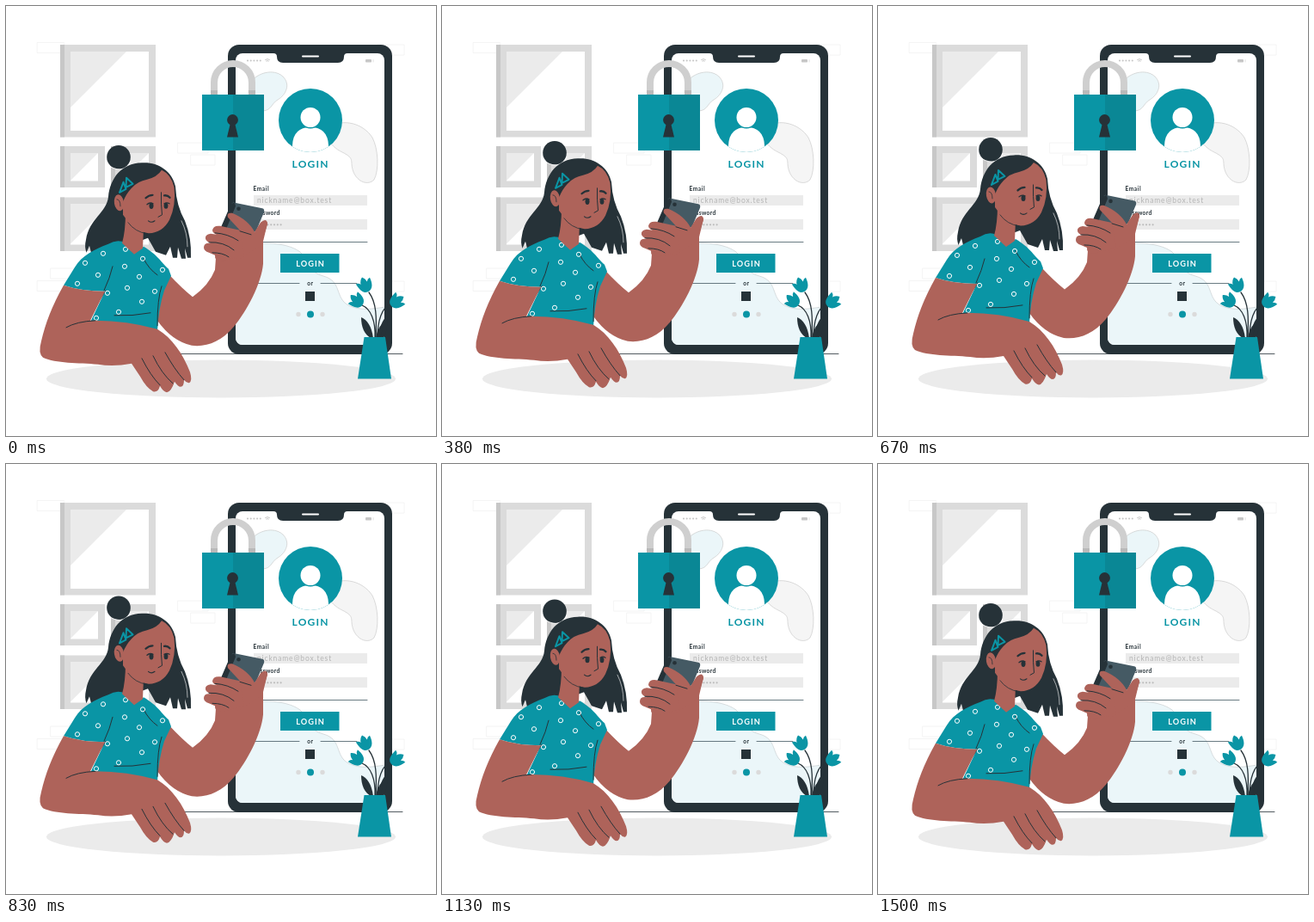
These frames come from a looping animation (500x500 px, 1540 ms). An HTML page with a canvas:

```html
<!DOCTYPE html>
<html lang="en">
<head>
<meta charset="utf-8">
<title>Login illustration</title>
<style>
  html, body { margin: 0; width: 100%; height: 100%; overflow: hidden; background: #fff; }
  canvas { display: block; width: 500px; height: 500px; }
</style>
</head>
<body>
<canvas id="stage"></canvas>
<script>
const LOOP = 1540, STEPS = 37, RISE = 10;
const TEAL = '#0a95a5', INK = '#263238', SKIN = '#ae635a', SLATE = '#455a64';
const PALE = '#ebebeb', GREY = '#dbdbdb', MID = '#c7c7c7', MIST = '#ebf6f9';

const canvas = document.getElementById('stage');
const ratio = window.devicePixelRatio || 1;
canvas.width = canvas.height = 500 * ratio;
const ctx = canvas.getContext('2d');
ctx.lineCap = ctx.lineJoin = 'round';

function fill(d, color) {
  ctx.fillStyle = color;
  ctx.fill(new Path2D(d));
}
function line(d, color = INK, width = 1) {
  ctx.strokeStyle = color;
  ctx.lineWidth = width;
  ctx.stroke(new Path2D(d));
}
function box(x, y, w, h, color, radius = 0) {
  ctx.fillStyle = color;
  ctx.beginPath();
  ctx.roundRect(x, y, w, h, radius);
  ctx.fill();
}
function oval(x, y, rx, ry, color, turn = 0) {
  ctx.fillStyle = color;
  ctx.beginPath();
  ctx.ellipse(x, y, rx, ry, turn, 0, 7);
  ctx.fill();
}
const dot = (x, y, r, color) => oval(x, y, r, r, color);

function label(text, x, y, size, color, { weight = 700, space = 0, align = 'left' } = {}) {
  ctx.font = `${weight} ${size}px Lato, sans-serif`;
  ctx.letterSpacing = space + 'px';
  ctx.textAlign = align;
  ctx.fillStyle = color;
  ctx.fillText(text, x + (align === 'center' ? space / 2 : 0), y);
}

function brick(x, y, w) {
  line(`M${x} ${y}h${w}v12h${-w}z`, '#f1f1f1', 0.8);
}

function picture(x, y, w, h, shade) {
  box(x, y, w, h, GREY);
  box(x, y, 5, h, MID);
  box(x + 12, y + 8, w - 20, h - 15.5, '#fff');
  fill(`M${x + 12} ${y + 8}h${shade}l${-shade} ${Math.min(shade, h - 15.5)}z`, PALE);
}

function drawWall() {
  [[36.5, 42.5, 31], [200, 159, 35], [215, 173, 28], [36.5, 319.5, 34],
   [52, 305, 30], [432, 45, 31], [440, 320, 23]].forEach(b => brick(...b));
  picture(63, 45, 111, 107.5, 65);
  picture(63, 163, 52, 48, 32);
  picture(122, 163, 52, 48, 32);
  picture(63, 222.5, 111, 62.5, 46);
  oval(250, 433.5, 203, 22, PALE);
  line('M100 404.5H461', INK, 0.8);
}

function drawAvatar() {
  dot(354, 133, 37, TEAL);
  ctx.save();
  ctx.beginPath();
  ctx.arc(354, 133, 37, 0, 7);
  ctx.clip();
  dot(354, 130, 13.5, TEAL);
  fill('M333 171V162Q334 141 354 141Q374 141 375 162V171Z', '#fff');
  dot(354, 129.5, 13, TEAL);
  dot(354, 129.5, 11.5, '#fff');
  ctx.restore();
}

function drawScreen() {
  box(258, 45, 191, 360, INK, 13);
  box(267, 55, 173, 339, '#fff', 8);

  ctx.save();
  ctx.beginPath();
  ctx.roundRect(267, 55, 173, 339, 8);
  ctx.clip();
  const drop = 'M285 88C292 78 311 72 322 82C331 91 326 103 316 109C308 114 309 121 299 122C285 122 278 101 285 88Z';
  fill(drop, MIST);
  line(drop, '#ccc', 0.7);
  const pebble = 'M378 140C392 131 415 136 426 153C433 166 434 191 428 202C421 209 409 205 404 193C399 180 407 178 391 170C376 163 368 148 378 140Z';
  fill(pebble, '#f5f5f5');
  line(pebble, '#ccc', 0.7);
  const wave = 'M266 281C287 274 325 273 342 286C356 300 351 309 369 314C391 320 382 339 398 348C412 355 427 352 441 350';
  fill(wave + 'V395H266Z', MIST);
  line(wave, '#c9cfd1', 0.7);
  ctx.restore();

  fill('M311 55Q315 55 315 59Q315 66 322 66H386Q393 66 393 59Q393 55 397 55Z', INK);
  line('M345 58.5H363', '#fff', 2);
  for (let i = 0; i < 5; i++) dot(281 + i * 3.7, 63.5, 1.1, MID);
  line('M301.5 62.5Q304 60.5 306.500 62.5M302.700 64Q304 63 305.300 64', MID, 1);
  box(418, 62, 7, 3.5, MID, 0.8);
  line('M427 62.500V65', GREY, 0.8);

  drawAvatar();
  label('LOGIN', 353.5, 188, 12, TEAL, { space: 1.2, align: 'center' });

  label('Email', 287.5, 215, 6.7, INK, { space: 0.5 });
  box(288, 220, 132, 12, PALE);
  label('nickname@box.test', 292, 229, 8.5, '#b5b5b5', { weight: 400, space: 0.85 });
  label('Password', 287.5, 243, 6.7, INK, { space: 0.3 });
  box(288, 248, 132, 12, PALE);
  for (let i = 0; i < 8; i++) dot(293 + i * 3.8, 254.3, 1.1, '#bdbdbd');

  line('M288 274.500H420', SLATE, 0.8);
  box(319, 288, 68.5, 22, TEAL);
  label('LOGIN', 353.5, 302.5, 9.2, '#fff', { space: 1, align: 'center' });
  line('M288 322.500H341M366 322.500H408', SLATE, 0.8);
  label('or', 353.5, 324.5, 6.5, INK, { space: 0.5, align: 'center' });
  box(348, 332, 11, 11, INK);
  dot(340, 358.5, 2.7, GREY);
  dot(354, 358.5, 4, TEAL);
  dot(368, 358.5, 2.7, GREY);
}

function drawLock() {
  ctx.lineCap = 'butt';
  line('M242 103V89A22 22 0 0 1 286 89V103', '#cfcfcf', 8);
  line('M242 98V103M286 98V103', '#b9b9b9', 8);
  ctx.lineCap = 'round';
  box(228, 103, 72, 65, TEAL);
  box(264, 103, 36, 65, '#0a8795');
  dot(263.5, 132.5, 6.4, INK);
  fill('M261 136H266L270 152.500H257Z', INK);
}

function flower(x, y, turn) {
  ctx.save();
  ctx.translate(x, y);
  ctx.rotate(turn);
  fill('M0 8C-7 8 -8 0 -9 -6Q-5 -6 -4 -3Q-3 -8 1 -10Q4 -7 4 -3Q6 -6 9 -6C9 1 7 8 0 8Z', TEAL);
  ctx.restore();
}

function drawPlant() {
  line('M430 386C431 362 431 345 422 333M429 386C430 366 424 352 414 348M432 386C432 366 437 350 448 346', INK, 1.3);
  fill('M427 386C425 372 420 365 413 362C413 374 417 382 424 386Z', INK);
  fill('M434 386C434 374 437 366 443 360C444 372 442 381 439 386Z', INK);
  fill('M430 386Q432 375 437 370Q438 380 435 386Z', INK);
  flower(417.5, 325, -0.45);
  flower(408, 343, -0.9);
  flower(454, 343.5, 0.9);
  fill('M416.500 385H441L448 433.500H409Z', TEAL);
}

function drawHair() {
  dot(131, 176, 13.8, INK);
  line('M121 187Q139 196 145 181', '#fff', 0.8);
  fill(`M158 182.500C134 183 121 201 119 222C117 241 97 247 93 272Q91 280 93.500 287L97 279L99 287
    L125 285L165 270L174 286L186 290L191 280L194 293H199L200 281L204 294H209L208 282L211 293H215
    Q216 270 208 250Q198 232 197 210C193 191 175 181 158 182.500Z`, INK);
  line('M204 250Q211 264 211 280', '#fff', 0.6);
}

function drawHead() {
  fill('M139 240Q139 262 135 276L149 289L159 282L160 258Z', SKIN);
  oval(131.5, 229, 5.6, 9.6, SKIN, -0.15);
  fill(`M136 228Q140 218 146 212Q153 204 164 202Q176 199 181 191Q192 196 195.500 211
    Q198 232 190 249Q182 264 166 264.500Q150 263 136 243Z`, SKIN);
  line('M129 225Q133 225 133 233', INK, 0.8);
  line('M142 252Q150 263 164 265', INK, 0.8);
  line('M180.500 217Q180 231 181.500 243L177 245.500', INK, 1);
  oval(169, 232.5, 2.5, 3.6, INK);
  oval(186, 232.5, 2.4, 3.5, INK);
  line('M164 231Q167 228 171 230M184 230Q187 228 190 230', INK, 1.3);
  line('M162.500 223.500Q166 220 170.500 220M184 220.500Q188 220 190.500 223', INK, 2.3);
  line('M165.500 250Q169 253 173 250', INK, 1.1);
  line('M132 217L136.500 205L139.500 213ZM139.500 211L140 200L147.500 207Z', TEAL, 2);
}

function drawShirt() {
  fill(`M135 274Q127 272 119 277C101 284 89 290 80 304L67 325Q88 332 115 332L98 368L176 378
    Q177 353 184 331L192 314L189 306C180 298 177 290 160 280Q156 284 149 287Z`, TEAL);
  line('M124 303Q121 316 114 331M160 294Q166 306 176 313M181 326Q176 340 176 372M126 360Q147 361 168 357M116 331L107 345');
  const rings = [[113, 288], [139, 283], [159, 294], [92, 299], [138, 303], [182, 307], [107, 313],
    [83, 323], [155, 315], [118, 334], [141, 328], [173, 332], [158, 344], [131, 356], [105, 363]];
  ctx.strokeStyle = '#fff';
  ctx.lineWidth = 1;
  for (const [x, y] of rings) {
    ctx.beginPath();
    ctx.arc(x, y, 2.6, 0, 7);
    ctx.stroke();
  }
}

function drawRaisedArm() {
  fill(`M183 328L190 313Q205 329 217 338.500Q236 325 243 307L244 293L262 275L290 264L299 254
    Q304 248 304 254L299 270V300C297 323 280 355 265 373C250 391 233 397 216 395
    Q193 390 176 366Q176 344 183 328Z`, SKIN);
}

function drawHandWithPhone() {
  fill('M266 229L298 235.500Q301 236 300 240L292 259Q290 264 286 263L253 268L249 264L262 231Q263 228 266 229Z', SLATE);
  fill('M266 229Q262 229 261 232L248 262L253 267L267 233Z', INK);
  dot(270.5, 236, 2.3, INK);
  fill('M258 246Q256 240 263 241C275 246 285 254 289 263L296 252Q303 246 304 253L298 278L270 296L252 267L272 261Z', SKIN);
  fill(`M272 261L249 256Q241 255 240 261Q240 264 245 266L238 265Q231 266 232 271Q233 274 238 276
    Q230 275 230 281Q230 285 236 287L243 290Q242 297 252 297L277 290Z`, SKIN);
  line('M243 264Q258 265 270 273M236 275Q253 274 265 284M240 287Q252 287 259 292M272 262L285 266', INK, 1);
}

function drawRestingArm() {
  fill(`M67 325Q88 332 115 332L98 366Q137 365 176 376C193 386 206 405 214 426Q217 436 213 438.500
    Q210 439 207 435Q207 443 203 443Q200 443 196 437Q192 449 187 449.500Q183 449 179 442
    Q177 450 171 448.500Q163 444 156 431L146 416Q125 420 107 417C84 415 58 416 43 409
    Q37 404 41 390C46 369 53 350 67 325Z`, SKIN);
  line('M70 374Q82 367 104 366', INK, 1);
  line('M158 410Q168 430 179 441M171 407Q181 428 194 439M185 403Q196 423 207 435', INK, 1);
}

function drawWoman() {
  drawHair();
  drawRaisedArm();
  drawShirt();
  drawHead();
  drawRestingArm();
  drawHandWithPhone();
}

// Linear rise and fall, advanced in 24 fps steps.
function liftAt(time) {
  const step = Math.min(STEPS - 1, Math.floor((time % LOOP + 3) * STEPS / LOOP));
  const phase = (step / (STEPS - 1) + 0.01) % 1;
  return RISE * (1 - Math.abs(2 * phase - 1));
}

function render(time) {
  ctx.setTransform(ratio, 0, 0, ratio, 0, 0);
  box(0, 0, 500, 500, '#fff');
  drawWall();
  drawScreen();
  drawLock();
  drawPlant();
  ctx.translate(0, -liftAt(time));
  drawWoman();
  requestAnimationFrame(render);
}
render(performance.now());
</script>
</body>
</html>
```
